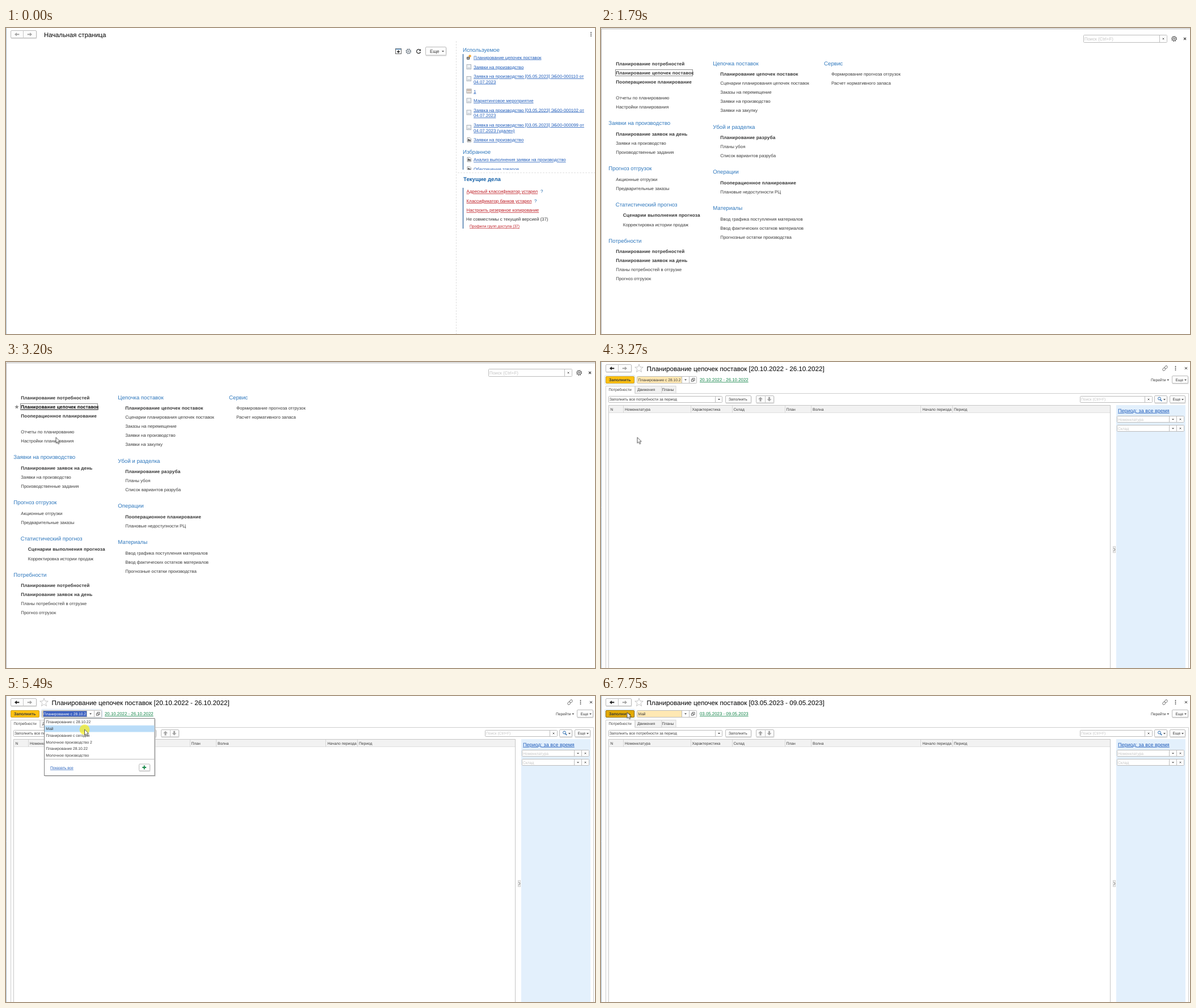
Animation, 1038 px wide and 540 px high, one loop 8 s. Source, as an HTML page:

```html
<!DOCTYPE html>
<html lang="ru">
<head>
<meta charset="utf-8">
<title>Планирование</title>
<style>
html, body { margin: 0; width: 100%; height: 100%; overflow: hidden; background: #fff; }
svg { display: block; width: 1038px; height: 540px; }
text { font-family: "Liberation Sans", Arial, sans-serif; fill: #3a3a3a; text-rendering: geometricPrecision; white-space: pre; }
.title { font-size: 11.63px; fill: #000; }
.home-title { font-size: 11.3px; fill: #000; }
.head { font-size: 9.7px; fill: #2f78bd; }
.todo { font-size: 9.65px; font-weight: bold; fill: #1762a9; }
.body { font-size: 7.87px; }
.bold { font-size: 8.1px; font-weight: bold; letter-spacing: .17px; fill: #333; }
.small { font-size: 6.7px; }
.tiny { font-size: 6.7px; }
.fill { font-size: 7.2px; font-weight: bold; }
.more { font-size: 8.2px; }
.period { font-size: 9px; }
.link { fill: #1f5cba; text-decoration: underline; }
.red { fill: #bd1a22; text-decoration: underline; }
.green { fill: #0b8043; text-decoration: underline; }
.hint { fill: #c2c2c2; }
.white { fill: #fff; }
.u { text-decoration: underline; }

/* one loop is 8 s, so 1% = 80 ms */
.a { opacity: 0; animation: 8s step-end infinite; }
.home { animation-name: home; }
.menu { animation-name: menu; }
.hover { animation-name: hover; }
.work { animation-name: work; }
.old { animation-name: old; }
.new { animation-name: new; }
.plan { animation-name: plan; }
.list { animation-name: list; }
.may { animation-name: may; }
.focus { animation-name: focus; }
.halo { animation-name: halo; }
.press { animation-name: press; }
.row { animation-name: row; }
.seen { animation-name: seen; }
.click { animation-name: click; }
.move { animation: move 8s step-end infinite; }
@keyframes home { 0% { opacity: 1 } 22.375%, 100% { opacity: 0 } }
@keyframes menu { 0% { opacity: 0 } 22.375% { opacity: 1 } 40.875%, 100% { opacity: 0 } }
@keyframes hover { 0% { opacity: 0 } 31.25%, 100% { opacity: 1 } }
@keyframes work { 0% { opacity: 0 } 40.875%, 100% { opacity: 1 } }
@keyframes old { 0% { opacity: 1 } 71.875%, 100% { opacity: 0 } }
@keyframes new { 0% { opacity: 0 } 71.875%, 100% { opacity: 1 } }
@keyframes plan { 0% { opacity: 1 } 53.5%, 100% { opacity: 0 } }
@keyframes list { 0% { opacity: 0 } 53.5% { opacity: 1 } 69.375%, 100% { opacity: 0 } }
@keyframes may { 0% { opacity: 0 } 69.375%, 100% { opacity: 1 } }
@keyframes focus { 0% { opacity: 0 } 51.75% { opacity: 1 } 96%, 100% { opacity: 0 } }
@keyframes halo { 0% { opacity: 1 } 51.75% { opacity: 0 } 96%, 100% { opacity: 1 } }
@keyframes press { 0% { opacity: 0 } 96%, 100% { opacity: 1 } }
@keyframes row {
  0% { opacity: 0; transform: none }
  62.5% { opacity: 1; transform: none }
  65% { opacity: 1; transform: translateY(11.7px) }
  69.375%, 100% { opacity: 0; transform: none }
}
@keyframes seen { 0% { opacity: 0 } .875% { opacity: 1 } 7.25% { opacity: 0 } 27.375%, 100% { opacity: 1 } }
@keyframes click {
  0% { opacity: 0 } 35.625% { opacity: .65 } 37.375% { opacity: 0 }
  51.75% { opacity: .65 } 53.5% { opacity: .3 } 55% { opacity: .15 } 56.875% { opacity: 0 }
  67.5% { opacity: .65 } 69.375% { opacity: 0 }
  96% { opacity: .65 } 96.875%, 100% { opacity: 0 }
}
@keyframes move {
  0% { transform: translate(944px, 528px) }
  .875% { transform: translate(944px, 528px); animation-timing-function: steps(8) }
  7.25% { transform: translate(-83px, 131px) }
  27.375% { transform: translate(191px, 113px); animation-timing-function: steps(7) }
  33.75% { transform: translate(112px, 80px) }
  37.375% { transform: translate(112px, 80px); animation-timing-function: steps(3) }
  40% { transform: translate(87.5px, 132.5px) }
  40.875% { transform: translate(63.5px, 132.5px) }
  42.5% { transform: translate(63.5px, 132.5px); animation-timing-function: steps(6) }
  47.5% { transform: translate(139px, 35px) }
  48.375% { transform: translate(146px, 31px) }
  49.25% { transform: translate(152.5px, 29.5px) }
  60.25% { transform: translate(152.5px, 29.5px); animation-timing-function: steps(7) }
  66.875% { transform: translate(138px, 58.5px) }
  71.875% { transform: translate(138px, 58.5px); animation-timing-function: steps(7) }
  78.625% { transform: translate(106px, 42px) }
  86.125% { transform: translate(45px, 42px) }
  96%, 100% { transform: translate(45.5px, 28.5px) }
}
</style>
</head>
<body>
<svg id="stage" viewBox="0 0 1038 540"></svg>
<script>
const stage = document.getElementById('stage');

function add(parent, tag, attrs, text) {
  const e = document.createElementNS('http://www.w3.org/2000/svg', tag);
  for (const k in attrs) e.setAttribute(k, attrs[k]);
  if (text) e.textContent = text;
  return parent.appendChild(e);
}
const group = (p, cls) => add(p, 'g', { class: cls });
const layer = (p, name) => group(p, 'a ' + name);

// y is the middle of the capital letters
const size = { title: 11.6, 'home-title': 11.3, head: 9.7, todo: 9.65, body: 7.87, bold: 8.1, small: 6.7, tiny: 6.7, fill: 7.2, more: 8.2, period: 9 };
const text = (p, x, y, s, cls = 'body') =>
  add(p, 'text', { x, y: y + size[cls.split(' ')[0]] * .36, class: cls }, s);
const rect = (p, x, y, w, h, fill = '#fff', stroke = 'none', rx = 0) =>
  add(p, 'rect', { x, y, width: w, height: h, fill, stroke, rx });
const path = (p, d, stroke, width = 1, fill = 'none') =>
  add(p, 'path', { d, stroke, 'stroke-width': width, fill });
const dot = (p, cx, cy, r, fill, stroke = 'none') =>
  add(p, 'circle', { cx, cy, r, fill, stroke });

const button = (p, x, y, w, h) => {
  rect(p, x + .5, y + 1.2, w, h, '#e2e2e2', 'none', 1.5);
  rect(p, x + .5, y + .5, w - 1, h - 1, '#fcfcfc', '#bcbcbc', 1.5);
};
const caret = (p, x, y) => path(p, `M${x - 2} ${y - 1}h4l-2 2.2z`, 'none', 0, '#444');
const cross = (p, x, y, r = 1.6, c = '#555', w = .9) =>
  path(p, `M${x - r} ${y - r}l${2 * r} ${2 * r}m0 ${-2 * r}l${-2 * r} ${2 * r}`, c, w);
const kebab = (p, x, y) => [-3, 0, 3].forEach(d => dot(p, x, y + d, .95, '#444'));
const arrow = (p, x, y, dir, c) =>
  path(p, `M${x - 4 * dir} ${y}l${4 * dir} -3.3v2.3h${4.3 * dir}v2h${-4.3 * dir}v2.3z`, 'none', 0, c);
const gear = (p, x, y, c) => {
  add(p, 'circle', { cx: x, cy: y, r: 4.2, fill: 'none', stroke: c, 'stroke-width': 1.5, 'stroke-dasharray': '1.7 1.6' });
  dot(p, x, y, 3.4, '#fff', c);
  dot(p, x, y, 1.2, 'none', c);
};
const nav = (p, back) => {
  button(p, 8, 4, 46, 14);
  path(p, 'M30.5 4v14', '#c8c8c8');
  arrow(p, 19, 11.3, 1, back);
  arrow(p, 42, 11.3, -1, '#a5a5a5');
};
const combo = (p, x, y, w, h, cuts) => {
  rect(p, x + .5, y + .5, w - 1, h - 1, '#fff', '#bcbcbc', 1);
  cuts.forEach(c => path(p, `M${c + .5} ${y}v${h}`, '#bcbcbc'));
};

function drawHome() {
  const g = layer(stage, 'home');
  path(g, 'M.5 0v540', '#a9bccb');
  nav(g, '#a5a5a5');
  text(g, 67, 11.6, 'Начальная страница', 'home-title');
  kebab(g, 1031, 11);

  rect(g, 686.5, 36.5, 10, 9, '#fff', '#666');
  path(g, 'M687 37.5h9', '#6aa0d0', 1.5);
  path(g, 'M689 41.8h5m-2.5 -2.5v5', '#222', 1.4);
  gear(g, 709.3, 41.2, '#6d7984');
  path(g, 'M730 39.2a3.5 3.5 0 1 0 .5 3', '#333', 1.3);
  path(g, 'M731 37v3.5h-3.5z', 'none', 0, '#333');
  button(g, 739, 33, 37, 15.5);
  text(g, 747, 41.2, 'Еще', 'more');
  caret(g, 770, 41.3);

  add(g, 'path', { d: 'M793.5 23v517M796 255.5h242', stroke: '#e0e0e0', 'stroke-dasharray': '3 2', fill: 'none' });
  path(g, 'M805.5 46v157M805.5 226v24M805.5 282v72', '#3a6ea5', 1.4);
  text(g, 805, 38.5, 'Используемое', 'head');
  text(g, 805, 219, 'Избранное', 'head');
  text(g, 806, 267, 'Текущие дела', 'todo');

  [[51.8, 'Планирование цепочек поставок'],
   [68.7, 'Заявки на производство'],
   [85.2, 'Заявка на производство [05.05.2023] ЭБ00-000110 от'],
   [94.9, '04.07.2023'],
   [111.7, '1'],
   [128.2, 'Маркетинговое мероприятие'],
   [144.7, 'Заявка на производство [03.05.2023] ЭБ00-000102 от'],
   [154.5, '04.07.2023'],
   [171.2, 'Заявка на производство [03.05.2023] ЭБ00-000099 от'],
   [181, '04.07.2023 (удален)'],
   [197.6, 'Заявки на производство'],
   [232.6, 'Анализ выполнения заявки на производство'],
   [249, 'Обеспечение товаров']].forEach(([y, s]) => text(g, 824, y, s, 'body link'));

  dot(g, 817.5, 49.5, 2.3, '#f3a73b');
  rect(g, 812, 51, 5, 4.5, '#444');
  rect(g, 813.3, 52.2, 2.2, 2, '#fff');
  [68.5, 89.5, 128, 149, 175.5].forEach(y => {
    rect(g, 812, y - 4, 7.5, 8, '#eef1f4', '#aab2ba');
    path(g, `M813.5 ${y + 2}h4.5`, '#b3bac2');
  });
  rect(g, 812, 107.8, 8, 7, '#fff', '#999');
  path(g, 'M812 110h8M814.7 108v7M817.4 108v7', '#a07a60', .7);
  [197.3, 232, 248.5].forEach(y => {
    path(g, `M813 ${y - 3.7}h4.5l2 2v5.6h-6.5z`, '#888', .8, '#fff');
    path(g, `M814.5 ${y + 2.5}v-3.5h1.5v3.5m1 0v-2.5h1v2.5`, '#333', 1);
  });
  rect(g, 804, 250.3, 230, 4.2);

  text(g, 811.5, 288.5, 'Адресный классификатор устарел', 'body red');
  text(g, 942, 288.5, '?').style.fill = '#1762a9';
  text(g, 811.5, 305, 'Классификатор банков устарел', 'body red');
  text(g, 931, 305, '?').style.fill = '#1762a9';
  text(g, 811.5, 321.5, 'Настроить резервное копирование', 'body red');
  text(g, 811, 337.5, 'Не совместимы с текущей версией (37)');
  text(g, 817, 350, 'Профили групп доступа (37)', 'tiny red');
}

function drawMenu() {
  const g = layer(stage, 'menu');
  path(g, 'M0 1.5h1038M.5 1v539', '#b0b0b0');
  combo(g, 850, 12, 148, 14, [984]);
  text(g, 852, 19.3, 'Поиск (Ctrl+F)', 'body hint');
  cross(g, 991, 19, 1.4);
  gear(g, 1010, 19, '#555');
  cross(g, 1029, 19, 2, '#444', 1.1);

  // "#" marks a heading, "*" a bold entry
  const column = (x, items) => items.forEach(([y, s, dx = 0]) => {
    const kind = s[0] === '#' ? 'head' : s[0] === '*' ? 'bold' : 'body';
    text(g, x + dx + (kind === 'head' ? 0 : 13), y, s.replace(/^[#*]/, ''), kind);
  });
  column(13.3, [
    [63.5, '*Планирование потребностей'], [79.5, '*Планирование цепочек поставок'],
    [95.5, '*Пооперационное планирование'], [123.5, 'Отчеты по планированию'], [139.5, 'Настройки планирования'],
    [168, '#Заявки на производство'], [187, '*Планирование заявок на день'],
    [203, 'Заявки на производство'], [219, 'Производственные задания'],
    [247.7, '#Прогноз отгрузок'], [267, 'Акционные отгрузки'], [283, 'Предварительные заказы'],
    [311.7, '#Статистический прогноз', 12.5], [330.5, '*Сценарии выполнения прогноза', 12.5],
    [346.7, 'Корректировка истории продаж', 12.5],
    [375.5, '#Потребности'], [394.5, '*Планирование потребностей'], [410.5, '*Планирование заявок на день'],
    [426.5, 'Планы потребностей в отгрузке'], [442.5, 'Прогноз отгрузок']]);
  column(197.3, [
    [62.5, '#Цепочка поставок'], [81.5, '*Планирование цепочек поставок'],
    [97.5, 'Сценарии планирования цепочек поставок'], [113.5, 'Заказы на перемещение'],
    [129.5, 'Заявки на производство'], [145.5, 'Заявки на закупку'],
    [174.3, '#Убой и разделка'], [193.3, '*Планирование разруба'], [209.3, 'Планы убоя'],
    [225.3, 'Список вариантов разруба'],
    [254, '#Операции'], [273, '*Пооперационное планирование'], [289, 'Плановые недоступности РЦ'],
    [317.8, '#Материалы'], [337, 'Ввод графика поступления материалов'],
    [353, 'Ввод фактических остатков материалов'], [369, 'Прогнозные остатки производства']]);
  column(393, [
    [62.5, '#Сервис'], [81.5, 'Формирование прогноза отгрузок'], [97.5, 'Расчет нормативного запаса']]);
  rect(g, 25.5, 73.5, 136, 11, 'none', '#8c8c8c');

  const h = layer(g, 'hover');
  text(h, 26.3, 79.5, 'Планирование цепочек поставок', 'bold u');
  star(h, 19, 79.3, 4, '#8a8a8a', 'none');
}

function star(p, x, y, r, fill, stroke) {
  const pts = Array.from({ length: 10 }, (_, i) => {
    const a = i * Math.PI / 5, k = i % 2 ? r * .42 : r;
    return [x + k * Math.sin(a), y - k * Math.cos(a)].map(v => v.toFixed(2)).join();
  });
  add(p, 'polygon', { points: pts.join(' '), fill, stroke, 'stroke-width': .8 });
}

function drawTop(g) {
  path(g, 'M.5 0v540', '#a9bccb');
  nav(g, '#222');
  star(g, 67, 11.5, 7.6, '#fff', '#b4b4b4');
  [['old', '20.10.2022 - 26.10.2022'], ['new', '03.05.2023 - 09.05.2023']].forEach(([name, days]) => {
    const v = layer(g, name);
    text(v, 80.5, 11.6, `Планирование цепочек поставок [${days}]`, 'title');
    text(v, 174, 31.5, days, 'body green');
  });
  const chain = add(g, 'g', { transform: 'translate(994 11) rotate(-45)' });
  rect(chain, -5.2, -2, 5.4, 4, 'none', '#888', 2);
  rect(chain, -.2, -2, 5.4, 4, 'none', '#888', 2);
  kebab(g, 1012.5, 11);
  cross(g, 1031, 11, 2.1, '#444', 1);

  rect(layer(g, 'halo'), 6.5, 23.5, 53.5, 16, '#fff', '#d3e4f3', 2);
  rect(g, 8.5, 25.5, 50, 12, '#fdc110', '#c9a032', 1.5);
  rect(layer(g, 'press'), 8.5, 25.5, 50, 12, '#e3aa00', '#8f6c00', 1.5);
  text(g, 14, 31.7, 'Заполнить', 'fill');

  rect(layer(g, 'focus'), 62.5, 23.5, 107, 15.5, '#fff', '#d3e4f3', 2);
  combo(g, 63, 25, 106, 13, [142, 155]);
  rect(g, 64, 26, 78, 11, '#ffe8b3');
  text(layer(g, 'plan'), 65.5, 31.4, 'Планирование с 28.10.2', 'small');
  text(layer(g, 'may'), 65.5, 31.4, 'Май', 'small');
  caret(g, 149, 31.5);
  rect(g, 161, 28.8, 4, 4, '#fff', '#666');
  rect(g, 159.3, 31, 3.5, 3.2, '#fff', '#666');

  text(g, 969, 31.5, 'Перейти', 'small');
  caret(g, 999.3, 31.7);
  button(g, 1006, 24, 29, 14);
  text(g, 1012.5, 31.5, 'Еще', 'small');
  caret(g, 1030, 31.7);
}

function drawTable(g) {
  rect(g, 60, 42.5, 47, 13, '#f2f2f2', '#d6d6d6');
  rect(g, 107, 42.5, 25, 13, '#f2f2f2', '#d6d6d6');
  path(g, 'M8.5 540V42.5H60V55.5H1035.5V540', '#cdcdcd');
  text(g, 13.5, 48.6, 'Потребности', 'small');
  text(g, 64, 48.6, 'Движения', 'small');
  text(g, 107.5, 48.6, 'Планы', 'small');

  combo(g, 13, 60, 201, 12, [201]);
  text(g, 15, 66, 'Заполнить все потребности за период', 'small');
  caret(g, 208, 66);
  button(g, 219, 59, 46, 13.5);
  text(g, 225, 66, 'Заполнить', 'small');
  button(g, 273, 59, 32, 13.5);
  path(g, 'M289.5 59v13', '#c8c8c8');
  path(g, 'M281 61.8l4 4h-2.5v3.8h-3v-3.8h-2.5zM296.5 69.6l4 -4h-2.5v-3.8h-3v3.8h-2.5z', 'none', 0, '#a5a5a5');
  combo(g, 844, 60, 128, 12, [958]);
  text(g, 846, 66, 'Поиск (Ctrl+F)', 'small hint');
  cross(g, 965, 66, 1.4);
  button(g, 975, 59, 23, 13.5);
  dot(g, 984, 64.5, 2.4, '#fff', '#2b6cb0');
  path(g, 'M985.6 66.3l2.6 2.7', '#2b6cb0', 1.6);
  caret(g, 993, 66.2);
  button(g, 1002, 59, 28, 13.5);
  text(g, 1007.5, 66, 'Еще', 'small');
  caret(g, 1025, 66.2);

  rect(g, 13.5, 76.5, 884, 470, '#fff', '#c6c6c6');
  rect(g, 14, 77, 883, 13, '#f2f2f2');
  path(g, 'M14 89.5h883', '#e0e0e0');
  [39, 158, 231, 324, 370, 563, 619].forEach(x => path(g, `M${x + .5} 77v13`, '#d6d6d6'));
  [[16.5, 'N'], [42, 'Номенклатура'], [160.5, 'Характеристика'], [233.5, 'Склад'], [326.5, 'План'],
   [373, 'Волна'], [566.5, 'Начало периода'], [622, 'Период']].forEach(([x, s]) => text(g, x, 83.3, s, 'small'));

  rect(g, 902.5, 325.5, 4, 11, '#f2f2f2', '#d2d2d2');
  path(g, 'M903.5 328l2.5 3 -2.5 3', '#777', .9);
  rect(g, 908, 76, 122, 464, '#e3f0fc');
  text(g, 911, 85.5, 'Период: за все время', 'period link');
  [[96, 'Номенклатура'], [112, 'Склад']].forEach(([y, s]) => {
    combo(g, 909, y - 1, 119, 12, [1001, 1014]);
    text(g, 911, y + 5.4, s, 'small hint');
    caret(g, 1008, y + 5.4);
    cross(g, 1021, y + 5.2, 1.4);
  });
}

function drawList(g) {
  const d = layer(g, 'list');
  rect(d, 65.5, 26.5, 76.5, 10, '#3a5fc0');
  text(d, 66, 31.4, 'Планирование с 28.10.2', 'small white');
  rect(d, 68.5, 41, 195, 101, '#d2d2d2');
  rect(d, 67.5, 39.5, 194.5, 101, '#fff', '#808080');
  rect(layer(d, 'row'), 68, 40.2, 193.5, 11.6, '#b9dcf8');
  ['Планирование с 28.10.22', 'Май', 'Планирование с сегодня', 'Молочное производство 2',
   'Планирование 28.10.22', 'Молочное производство'].forEach((s, i) => text(d, 70.5, 46 + i * 11.7, s, 'small'));
  path(d, 'M68 111.5h194', '#bdbdbd');
  text(d, 78, 126.5, 'Показать все', 'tiny link');
  button(d, 234, 119.5, 20, 13);
  path(d, 'M240.3 126h6.8m-3.4 -3.4v6.8', '#1a8a4c', 1.9);
}

function drawCursor() {
  const g = group(layer(stage, 'seen'), 'move');
  add(g, 'circle', { class: 'a click', cx: .5, cy: .8, r: 9, fill: '#ffee00' });
  path(g, 'M.5 .5V10.6L2.9 8.5 4.6 12.2 6.3 11.4 4.7 7.8H7.8Z', '#444', .9, '#fff');
}

drawHome();
drawMenu();
const work = layer(stage, 'work');
drawTop(work);
drawTable(work);
drawList(work);
drawCursor();
</script>
</body>
</html>
```
